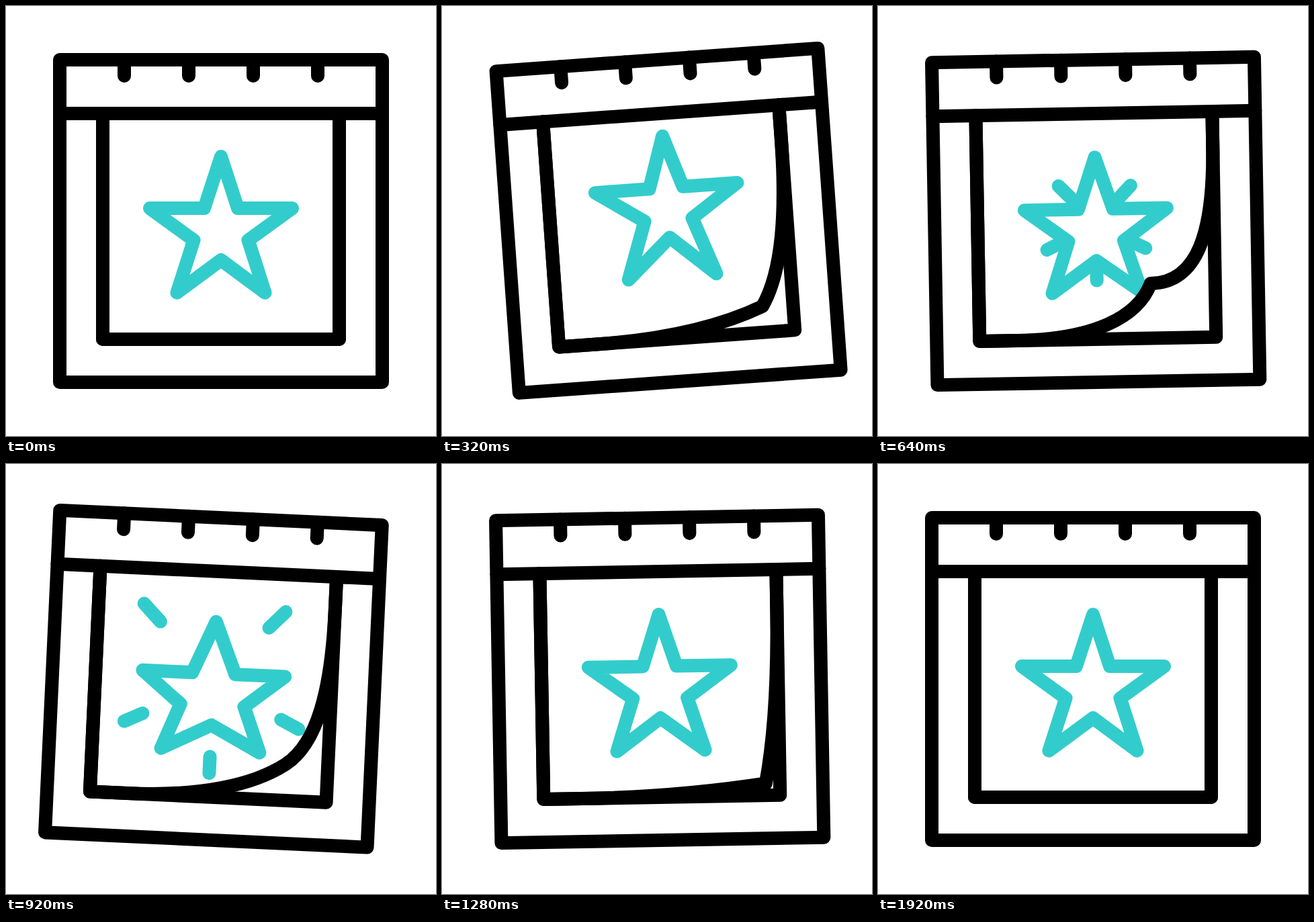
An HTML page that plays this animation: 640x640 px, repeating every 2 s.

```html
<!DOCTYPE html>
<html lang="en">
<head>
<meta charset="utf-8">
<title>Calendar star</title>
<style>
  html, body { margin: 0; width: 100%; height: 100%; overflow: hidden; background: #fff; }
  svg { display: block; width: 100%; height: 100%; }
  .ink, .accent { fill: none; stroke-width: 20; stroke-linecap: round; stroke-linejoin: round; }
  .ink { stroke: #000; }
  .accent { stroke: #3cc; }
</style>
</head>
<body>
<svg viewBox="0 0 640 640">
  <defs><clipPath id="pageClip"><path id="pageArea"/></clipPath></defs>
  <g id="calendar">
    <path class="ink" d="M80 80H560V560H80Z"/>
    <path class="ink" d="M144 160V496H496V160"/>
    <g clip-path="url(#pageClip)">
      <path id="rays" class="accent"/>
      <path id="star" class="accent"/>
    </g>
    <path id="page" class="ink"/>
    <path class="ink" d="M80 160H560M176 80V104M272 80V104M368 80V104M464 80V104"/>
  </g>
</svg>
<script>
const LOOP = 2000;
const el = id => document.getElementById(id);
const clamp = x => Math.min(1, Math.max(0, x));
const mix = (a, b, p) => a + (b - a) * p;
const smooth = p => p * p * (3 - 2 * p);
const linear = p => p;
const pt = (x, y) => `${x.toFixed(2)} ${y.toFixed(2)}`;

// keys: [time, value] pairs in order of time
function track(keys, t, ease = smooth) {
  if (t <= keys[0][0]) return keys[0][1];
  for (let i = 1; i < keys.length; i++) {
    const [t0, a] = keys[i - 1], [t1, b] = keys[i];
    if (t < t1) return mix(a, b, ease((t - t0) / (t1 - t0)));
  }
  return keys[keys.length - 1][1];
}

const SWING = [[0, 0], [440, -5], [840, 3], [1280, -1], [1840, 0]];
const CURL = [[30, 0], [640, 1], [1460, 0]];
const JUMP = [[0, 0], [320, 1], [590, 0]];
const CROUCH = [[570, 0], [900, 1], [1250, 0]];

// Page corner: flat position, then fully curled position
const CORNER = [
  [299, 496, 313, 496], [397, 496, 380, 465], [496, 496, 400, 414.5],
  [496, 400, 470, 414.5], [496, 304, 496, 340]
];

function pagePath(curl) {
  const p = CORNER.map(([x0, y0, x1, y1]) => pt(mix(x0, x1, curl), mix(y0, y1, curl)));
  return `M144 160V496H200C${p[0]} ${p[1]} ${p[2]}C${p[3]} ${p[4]} 496 208V160`;
}

// The feet lag behind the body in a jump and stay planted in a crouch
function starPath(jump, crouch) {
  const points = [];
  for (let i = 0; i < 10; i++) {
    const angle = i * Math.PI / 5, radius = i % 2 ? 42.6 : 111.5;
    let x = radius * Math.sin(angle), y = 335.5 - radius * Math.cos(angle);
    const side = Math.sign(Math.round(x));
    const foot = i === 4 || i === 6, hip = i === 3 || i === 7;
    if (foot) {
      x += side * 8 * crouch;
      y += 1 - 23 * jump;
    } else {
      y += 11 * crouch - (i === 5 ? 33 : 30) * jump;
      if (i % 2) x += side * 7 * crouch;
      if (hip) x -= side * 5 * jump;
    }
    points.push(pt(320 + x, y));
  }
  return `M${points.join("L")}Z`;
}

// x, y of the root, then the full travel
const RAYS = [
  [296, 298, -92, -93], [344, 298, 86, -90],
  [279, 346, -97, 47], [361, 346, 97, 47], [320, 379, 0, 89]
];

function rayPath(t) {
  const tail = clamp((t - 600) / 500), head = clamp((t - 480) / 480);
  if (head <= 0 || tail >= 1) return "";
  return RAYS.map(([x, y, dx, dy]) =>
    `M${pt(x + dx * tail, y + dy * tail)}L${pt(x + dx * head, y + dy * head)}`).join("");
}

function draw(t) {
  const page = pagePath(track(CURL, t, linear));
  el("calendar").setAttribute("transform", `rotate(${track(SWING, t).toFixed(3)} 320 80)`);
  el("page").setAttribute("d", page);
  el("pageArea").setAttribute("d", page + "Z");
  el("star").setAttribute("d", starPath(track(JUMP, t), track(CROUCH, t)));
  el("rays").setAttribute("d", rayPath(t));
}

const start = performance.now();
function tick() {
  const t = (performance.now() - start) % LOOP;
  draw(Math.floor(t / 40) * 40);
  requestAnimationFrame(tick);
}
draw(0);
requestAnimationFrame(tick);
</script>
</body>
</html>
```
